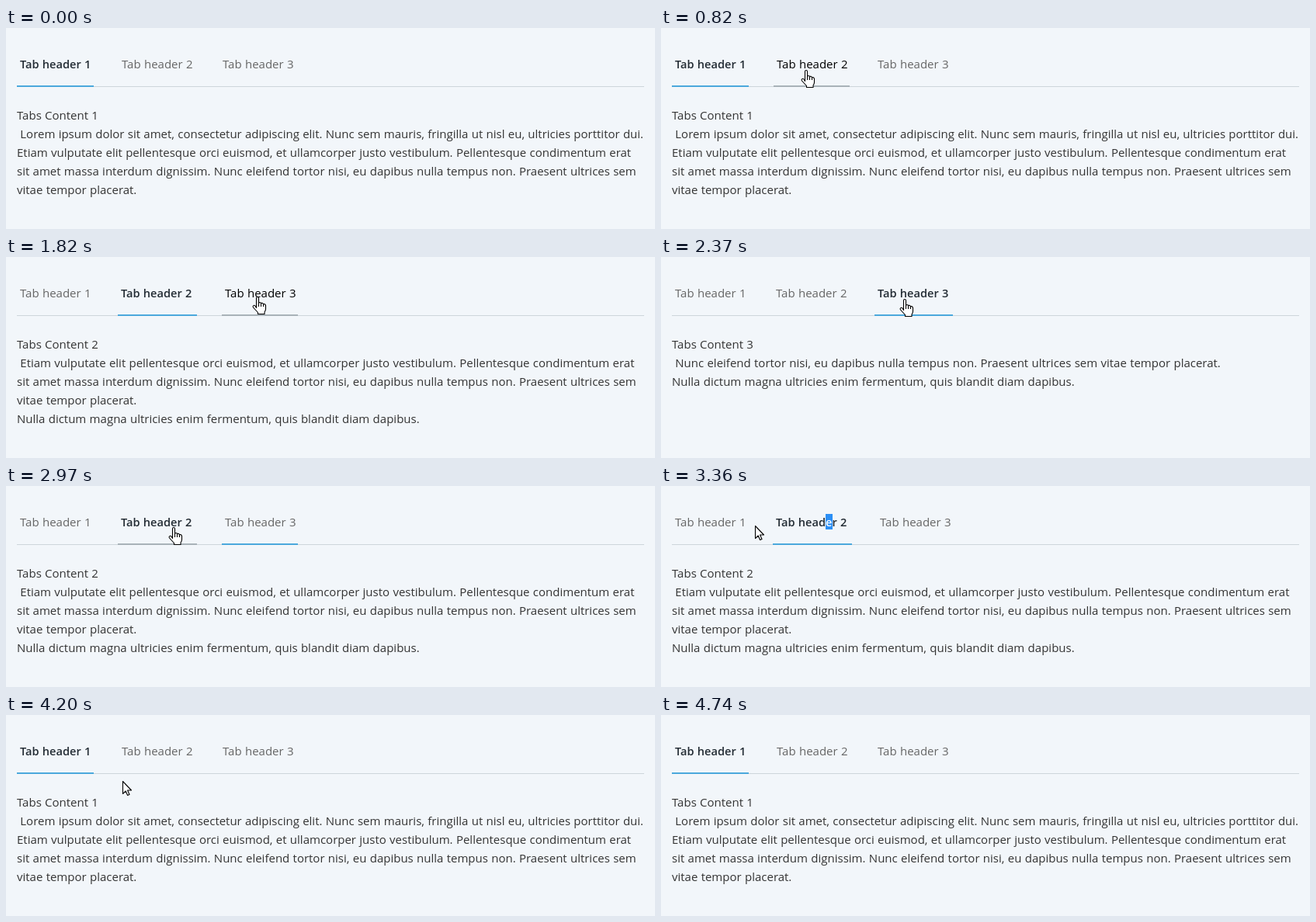
Animation of 836x259 px, one loop 5060 ms. Source, as an HTML page:

```html
<!DOCTYPE html>
<html lang="en">
<head>
<meta charset="utf-8">
<title>Tabs</title>
<style>
  html, body { margin: 0; width: 100%; height: 100%; overflow: hidden; background: #f2f6fa; }
  #stage {
    position: relative; width: 836px; height: 259px; overflow: hidden;
    font: 15px/24px "Open Sans", "Noto Sans", sans-serif; word-spacing: .4px;
    color: #333; white-space: pre; cursor: default;
  }
  #rule { position: absolute; left: 14px; top: 75px; width: 808px; height: 1px; background: #cdd5da; }
  .tab { position: absolute; top: 34px; height: 42px; color: #666; }
  .tab span { position: absolute; left: 4px; top: 0; }
  .tab i { position: absolute; left: 0; bottom: 0; width: 100%; height: 2px; }
  .tab.hover { color: #000; }
  .tab.active { color: #222b33; font-weight: 600; font-size: 14.6px; }
  .tab b { font-weight: inherit; }
  .tab b.picked { background: #2b8ff5; color: #fff; }
  #content { position: absolute; left: 14px; top: 100px; }
  #cursor { position: absolute; left: 0; top: 0; overflow: visible; }
  #cursor path { fill: #fff; stroke: #000; stroke-width: 1.1; stroke-linejoin: round; }
</style>
</head>
<body>
<div id="stage">
  <div id="rule"></div>
  <div id="content"></div>
  <svg id="cursor" width="1" height="1">
    <path id="arrow" d="M.5 .5V16.5L4.2 13 6.6 18.5 9 17.5 6.6 12H11.5Z"/>
    <path id="hand" d="M-1.5 14.5V2Q-1.5 .5 0 .5T1.5 2V8.5Q1.5 7.5 3 7.5T4.5 9Q4.8 8.2 6 8.4T7.5 10Q8 9.4 9 9.6T10.5 11.5V16Q10.5 18 9 20V22.5H.5V20.5L-5.5 14Q-6.5 12.5-5.3 11.6T-3 12ZM1.5 8.5V13M4.5 9V13M7.5 10V13"/>
  </svg>
</div>
<script>
const LOOP = 5060;
const BLUE = [75, 168, 220, 1], GREY = [168, 178, 184, 1];

const etiam = "Etiam vulputate elit pellentesque orci euismod, et ullamcorper justo vestibulum. Pellentesque condimentum erat\n";
const nunc = "Nunc eleifend tortor nisi, eu dapibus nulla tempus non. Praesent ultrices sem";
const placerat = "vitae tempor placerat.";
const nulla = "\nNulla dictum magna ultricies enim fermentum, quis blandit diam dapibus.";
const massa = "sit amet massa interdum dignissim. " + nunc + "\n" + placerat;
const texts = [
  "Lorem ipsum dolor sit amet, consectetur adipiscing elit. Nunc sem mauris, fringilla ut nisl eu, ultricies porttitor dui.\n" + etiam + massa,
  etiam + massa + nulla,
  nunc + " " + placerat + nulla
];

// Pointer path: step, x, y
const path = [
  [1, 484, 218], [2, 452, 206], [4, 345, 159], [6, 240, 111], [8, 174, 81],
  [9, 182, 66], [10, 186, 56], [11, 187, 54], [17, 187, 54],
  [18, 193, 54], [19, 210, 53], [22, 291, 52], [23, 314, 51], [24, 324, 51], [29, 324, 51],
  [30, 321, 53], [31, 314, 54], [32, 299, 55], [35, 238, 54], [36, 223, 54], [37, 216, 53], [39, 216, 53],
  [40, 219, 51], [41, 213, 50], [42, 190, 50], [43, 152, 50], [44, 121, 51],
  [45, 110, 50], [46, 101, 49], [47, 96, 48], [53, 96, 48],
  [54, 108, 60], [55, 150, 85], [56, 225, 118], [57, 330, 154], [60, 679, 250], [61, 728, 254]
];

const $ = id => document.getElementById(id);
const content = $("content"), cursor = $("cursor"), arrow = $("arrow"), hand = $("hand");

const tabs = [1, 2, 3].map(n => {
  const el = document.createElement("div");
  el.innerHTML = `<span>Tab head<b>e</b>r ${n}</span><i></i>`;
  $("stage").insertBefore(el, content);
  return { el, bar: el.querySelector("i"), letter: el.querySelector("b") };
});

const stepAt = t => Math.floor(.08 + (t < 590 ? t / 73.75 : 8 + (t - 590) / 76.85));

const activeAt = k => k < 14 ? 0 : k < 26 ? 1 : k < 39 ? 2 : k < 49 ? 1 : 0;

function boxes(active) {
  return [
    [14, active === 0 ? 99 : 98],
    [active === 0 ? 145 : 144, active === 1 ? 102 : 98],
    [active === 1 ? 278 : 275, active === 2 ? 101 : 98]
  ];
}

function pointerAt(k) {
  const j = path.findIndex(p => p[0] >= k);
  if (k < 1 || j < 0) return null;
  const b = path[j], a = path[j - 1] || b;
  const f = b === a ? 0 : (k - a[0]) / (b[0] - a[0]);
  return [1, 2].map(i => Math.round(a[i] + (b[i] - a[i]) * f));
}

function hoverAt(k) {
  const p = pointerAt(k);
  if (!p || p[1] < 34 || p[1] > 76) return -1;
  return boxes(activeAt(k)).findIndex(([x, w]) => p[0] >= x && p[0] < x + w);
}

function barTarget(i, k) {
  if (activeAt(k) === i) return BLUE;
  return hoverAt(k) === i ? GREY : null;
}

// Underlines fade over two steps
function barColor(i, k) {
  const a = barTarget(i, k - 2), b = barTarget(i, k - 1);
  if (!a && !b) return "transparent";
  const clear = c => [...c.slice(0, 3), 0];
  const from = a || clear(b), to = b || clear(a);
  return `rgba(${from.map((v, n) => (v + to[n]) / 2)})`;
}

function draw(k) {
  const active = activeAt(k), hover = hoverAt(k), p = pointerAt(k);
  boxes(active).forEach(([x, w], i) => {
    const { el, bar, letter } = tabs[i];
    el.className = "tab" + (i === active ? " active" : i === hover ? " hover" : "");
    el.style.left = x + "px";
    el.style.width = w + "px";
    bar.style.background = barColor(i, k);
    letter.className = i === 1 && k >= 41 && k < 48 ? "picked" : "";
  });
  content.textContent = `Tabs Content ${active + 1}\n ${texts[active]}`;
  cursor.style.display = p ? "" : "none";
  if (p) cursor.style.transform = `translate(${p[0]}px, ${p[1]}px)`;
  hand.style.display = hover < 0 ? "none" : "";
  arrow.style.display = hover < 0 ? "" : "none";
}

let last = -1;
const start = performance.now();
function tick() {
  const k = stepAt((performance.now() - start) % LOOP);
  if (k !== last) draw(last = k);
  requestAnimationFrame(tick);
}
tick();
</script>
</body>
</html>
```
